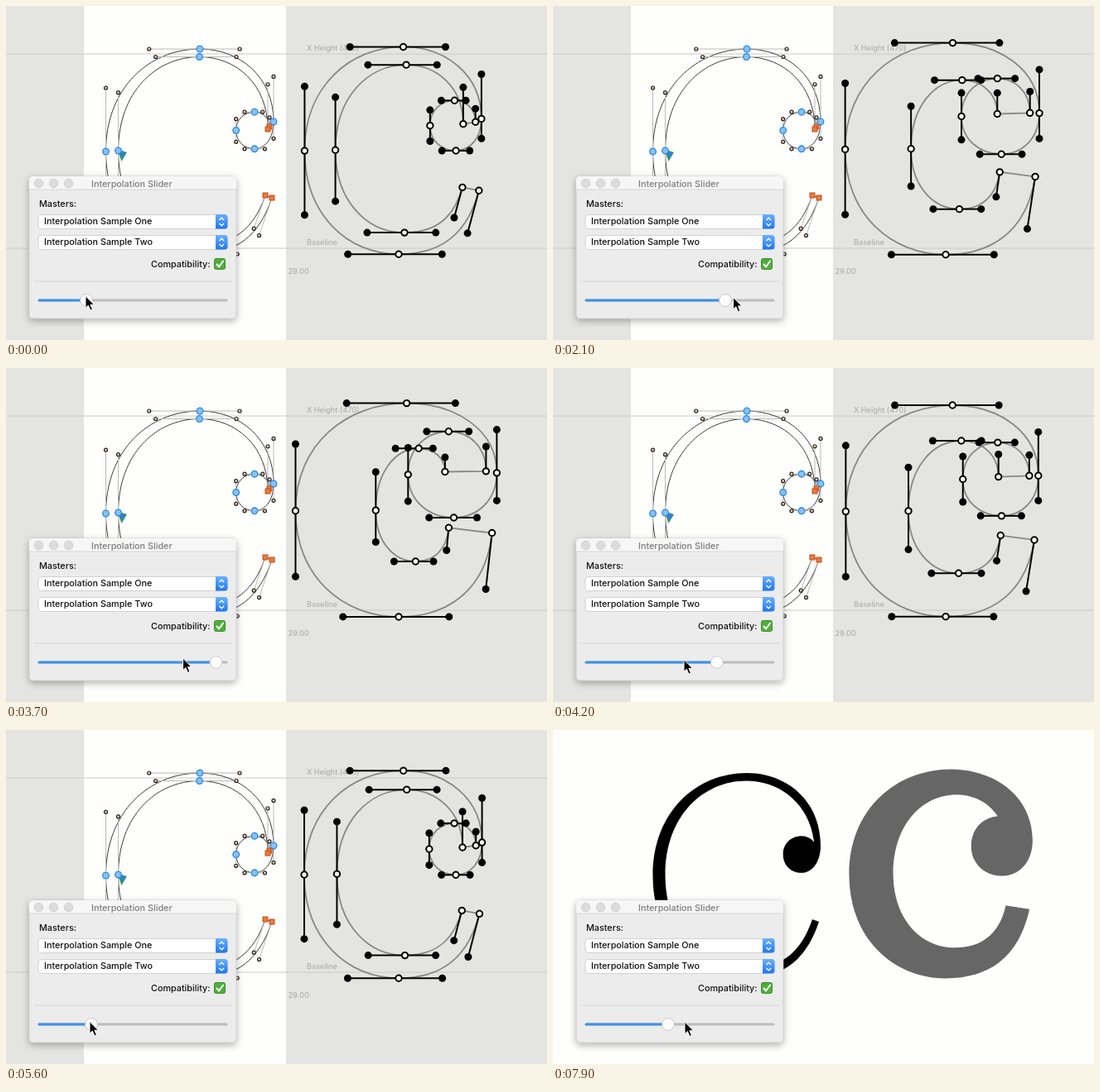
Write an HTML page that moves like this. It is 653 by 404 pixels and loops after 8 s.

```html
<!DOCTYPE html>
<html lang="en">
<head>
<meta charset="utf-8">
<title>Interpolation Slider</title>
<style>
  html, body { margin: 0; width: 100%; height: 100%; overflow: hidden; background: #fefefd; }
  svg { display: block; width: 653px; height: 404px; }
  text { font-family: Inter, "Open Sans", sans-serif; font-size: 10.8px; font-weight: 500; fill: #111; }
  .label { font-size: 9.1px; fill: #b0b0b0; }
  .curve { fill: none; }
  #ghost .curve { stroke: #888; stroke-width: 1.8; }
  #ghost .arm { stroke: #000; stroke-width: 2; }
  #ghost .tip { fill: #000; }
  #ghost .node { fill: #fff; stroke: #000; stroke-width: 2; }
  #drawn .curve { stroke: #3c3c3c; stroke-width: 1; }
  #drawn .arm { stroke: #b9b9b9; stroke-width: 1; }
  #drawn .tip { fill: #f6d3ac; stroke: #222; stroke-width: 1.2; }
  #drawn .node { fill: #83c3fb; stroke: #2c86dc; stroke-width: 1.3; }
  #drawn .corner { fill: #ee7a3a; stroke: #b9501f; stroke-width: 1; }
</style>
</head>
<body>
<svg viewBox="0 0 653 404">
  <defs>
    <filter id="shadow" x="-10%" y="-10%" width="120%" height="125%">
      <feDropShadow dx="0" dy="3" stdDeviation="4" flood-opacity=".3"/>
    </filter>
    <linearGradient id="blue" x2="0" y2="1">
      <stop stop-color="#69b0fa"/><stop offset="1" stop-color="#2077f0"/>
    </linearGradient>
    <g id="popup">
      <rect x="39" y=".5" width="228" height="17" rx="3.5" fill="#fff" stroke="#c9c9c9" stroke-width=".8"/>
      <path d="M253 0H264A3.5 3.5 0 0 1 267.5 3.5V14A3.5 3.5 0 0 1 264 17.5H253Z" fill="url(#blue)"/>
      <path d="M257.5 7L260.3 4.2L263.1 7M257.5 11L260.3 13.8L263.1 11" fill="none" stroke="#fff" stroke-width="1.3"/>
    </g>
  </defs>

  <rect width="653" height="404" fill="#fefefd"/>
  <g id="edit">
    <path d="M0 0H94V404H0ZM338 0H653V404H338Z" fill="#e4e4e3"/>
    <path d="M0 58H653M0 293H653" stroke="#cacaca"/>
    <text class="label" x="363" y="53.5">X Height (470)</text>
    <text class="label" x="363" y="289">Baseline</text>
    <text class="label" x="340.5" y="324">29.00</text>
    <path d="M134 173L146 177L139.5 188Z" fill="#3e9e48"/>
    <path d="M136 175L145 178L140 185Z" fill="#2f7fd8"/>
    <g id="drawn"></g>
    <g id="ghost"></g>
  </g>
  <g id="preview">
    <path id="solid" fill="#000"/>
    <path id="blend" fill="#666"/>
  </g>

  <g id="dialog">
    <rect x="28" y="206" width="250" height="172" rx="4.5" fill="#ececec" stroke="#bdbdbd" stroke-width=".6" filter="url(#shadow)"/>
    <path d="M28 222V210.5A4.5 4.5 0 0 1 32.5 206H273.5A4.5 4.5 0 0 1 278 210.5V222Z" fill="#f6f6f6"/>
    <path d="M28 222H278" stroke="#d5d5d5"/>
    <g fill="#dcdcdc" stroke="#cbcbcb" stroke-width=".8">
      <circle cx="39.5" cy="214.5" r="5.3"/><circle cx="57.5" cy="214.5" r="5.3"/><circle cx="75.5" cy="214.5" r="5.3"/>
    </g>
    <text x="103" y="218.5" style="fill:#7d7d7d">Interpolation Slider</text>
    <text x="40" y="243">Masters:</text>
    <use href="#popup" y="252"/>
    <use href="#popup" y="277"/>
    <text x="46" y="264">Interpolation Sample One</text>
    <text x="46" y="289">Interpolation Sample Two</text>
    <text x="175" y="316">Compatibility:</text>
    <rect x="251.5" y="305.5" width="13" height="13" rx="2" fill="#4fae3b" stroke="#3c8f2c"/>
    <path d="M254 312L257 315.5L262.5 308" fill="none" stroke="#fff" stroke-width="2"/>
    <path d="M34 333H273" stroke="#d4d4d4"/>
    <path d="M40 356H266" stroke="#bcbcbc" stroke-width="3" stroke-linecap="round"/>
    <path id="level" stroke="#3f92ea" stroke-width="3" stroke-linecap="round"/>
    <circle id="knob" cy="356" r="7.4" fill="#fdfdfd" stroke="#c4c4c4" stroke-width=".9"/>
  </g>
  <path id="cursor" d="M0 0V14.6L3.3 11.5L5.9 17.4L8.4 16.3L5.9 10.6H10.5Z" stroke="#fff"/>
</svg>

<script>
const $ = id => document.getElementById(id);
const LOOP = 8000, STEP = 100, PREVIEW_AT = 6500;
const TRACK = { left: 39, width: 228 };
const KNOB_LAG = 350;
const COPY_OFFSET = 244;

// Pointer path along the track: time in ms, x.
const DRAG = [[300, 96], [950, 132], [1300, 170], [1450, 198], [2750, 237], [3100, 246], [3300, 258],
  [4200, 158], [5250, 102], [5600, 101], [5900, 96], [6850, 96], [7900, 159]];

function pointerX(t) {
  const i = DRAG.findIndex(key => key[0] > t);
  if (i < 0) return DRAG[DRAG.length - 1][1];
  if (i === 0) return DRAG[0][1];
  const [t0, a] = DRAG[i - 1], [t1, b] = DRAG[i];
  return a + (b - a) * (t - t0) / (t1 - t0);
}

const isCorner = node => 'hook tip'.includes(node.kind);

// A handle reaches a fixed share of the way to its neighbour, along the node's own direction.
function reach(node, neighbour, weight) {
  if (isCorner(node) && isCorner(neighbour)) return node.p;
  const [x, y] = node.p;
  const dx = neighbour.p[0] - x, dy = neighbour.p[1] - y;
  if (node.kind === 'flat') return [x + .54 * dx, y];
  if (node.kind === 'tip') return [x + (.17 - .11 * weight) * dx, y + .67 * dy];
  return [x, y + .62 * dy];
}

// The letter c; weight 0 is the thin master and 1 the bold one.
function letter(w, shift) {
  const node = (kind, x, y) => ({ kind, p: [x + shift, y] });
  const ball = { x: 300 - 7 * w, y: 150.5 - 23 * w, r: 22.3 + 31.7 * w, lean: 3.3 * w };
  const nodes = [
    node('flat', 234 + 6 * w, 52 - 10 * w),
    node('steep', 323 + 27 * w, 140 - 14 * w),
    node('flat', ball.x + ball.lean, ball.y + ball.r),
    node('steep', ball.x - ball.r, ball.y),
    node('flat', ball.x - ball.lean, ball.y - ball.r),
    node('hook', 318 + 18.5 * w, 146 - 22.5 * w),
    node('hook', 316 - 32 * w, 149 - 25 * w),
    node('flat', 233.5 + 22 * w, 61.5 + 38 * w),
    node('steep', 135.5 + 71 * w, 175 - 3 * w),
    node('flat', 232 + 19.5 * w, 289 - 58.5 * w),
    node('tip', 313 - 24 * w, 229 - 38 * w),
    node('tip', 321 + 23 * w, 232 - 34.5 * w),
    node('flat', 230, 300 + w),
    node('steep', 120.5 - 16 * w, 176 - 3.5 * w)
  ];
  const count = nodes.length;
  nodes.forEach((n, i) => {
    n.in = reach(n, nodes[(i + count - 1) % count], w);
    n.out = reach(n, nodes[(i + 1) % count], w);
  });
  return nodes;
}

function outline(nodes) {
  const segments = nodes.map((n, i) => {
    const next = nodes[(i + 1) % nodes.length];
    return `C${n.out} ${next.in} ${next.p}`;
  });
  return `M${nodes[0].p}${segments.join('')}Z`;
}

const dot = (cls, [x, y], r) => `<circle class="${cls}" cx="${x}" cy="${y}" r="${r}"/>`;
const square = ([x, y]) => `<rect class="corner" x="${x - 3}" y="${y - 3}" width="6" height="6"/>`;

function diagram(nodes, tipRadius, mark) {
  const arms = nodes.flatMap(n => [n.in, n.out].filter(end => end !== n.p).map(end => [n.p, end]));
  return `<path class="curve" d="${outline(nodes)}"/>` +
    arms.map(([from, to]) => `<path class="arm" d="M${from}L${to}"/>`).join('') +
    arms.map(([, to]) => dot('tip', to, tipRadius)).join('') +
    nodes.map(mark).join('');
}

function drawThin() {
  const nodes = letter(0, 0);
  $('drawn').innerHTML = diagram(nodes, 2, n => isCorner(n) ? square(n.p) : dot('node', n.p, 3.8));
  $('solid').setAttribute('d', outline(nodes));
}

function render(t) {
  const knob = pointerX(t - KNOB_LAG) + 1;
  const nodes = letter((knob - TRACK.left) / TRACK.width, COPY_OFFSET);
  const preview = t >= PREVIEW_AT;
  $('edit').style.display = preview ? 'none' : '';
  $('preview').style.display = preview ? '' : 'none';
  if (preview) $('blend').setAttribute('d', outline(nodes));
  else $('ghost').innerHTML = diagram(nodes, 4.5, n => dot('node', n.p, 3.7));
  $('knob').setAttribute('cx', knob);
  $('level').setAttribute('d', `M40 356H${knob}`);
  const pointerY = 352 + 2 * Math.cos((t - 1300) / 570);
  $('cursor').setAttribute('transform', `translate(${pointerX(t)} ${pointerY})`);
}

const start = performance.now();
function tick() {
  const t = (performance.now() - start) % LOOP;
  render(Math.floor(t / STEP) * STEP);
  requestAnimationFrame(tick);
}
drawThin();
tick();
</script>
</body>
</html>
```
